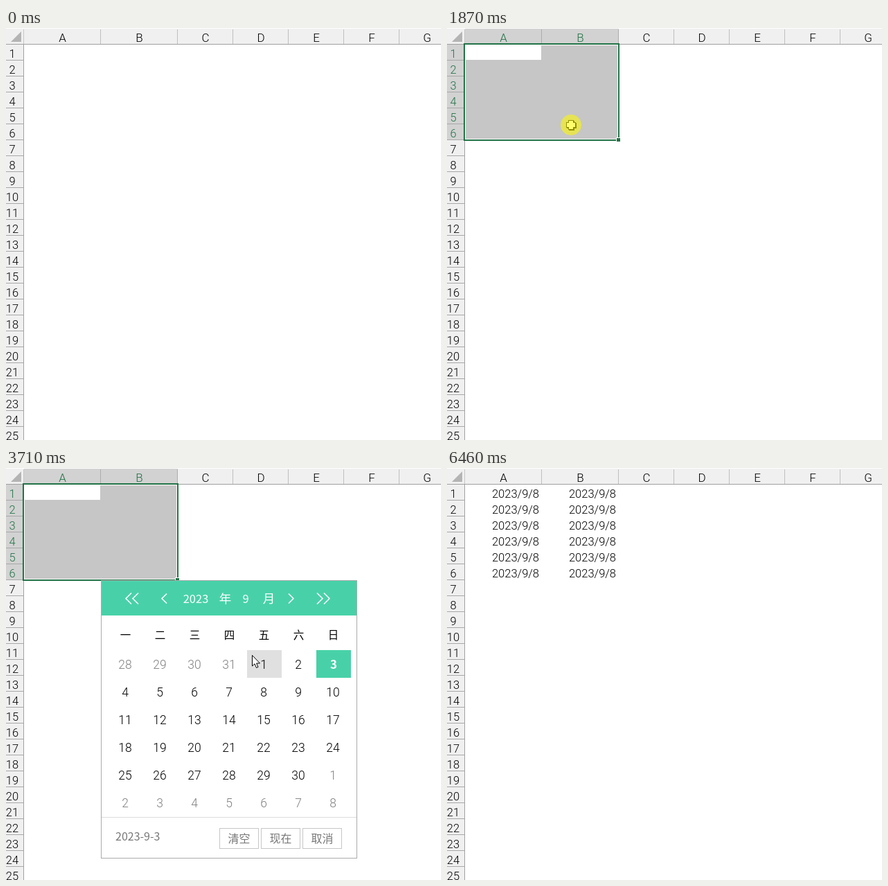
These frames come from a looping animation (628x595 px, 6.54 s). An HTML page with a canvas:

```html
<!DOCTYPE html>
<html lang="zh-CN">
<head>
<meta charset="utf-8">
<style>
html, body { margin: 0; width: 100%; height: 100%; overflow: hidden; background: #fff; }
canvas { display: block; }
</style>
</head>
<body>
<canvas id="stage" width="628" height="595"></canvas>
<script>
const g = document.getElementById('stage').getContext('2d');
const LOOP = 6540, START = 70, TICK = 77.4, ROW = 23;
const HAN = '"Noto Sans CJK SC", "Noto Sans CJK JP", sans-serif';
const LIGHT = 'Roboto, "Open Sans", sans-serif';
const GREEN = '#217346', MINT = '#48d1a8', INK = '#333', BLUE = '#1e7ec2', ORANGE = '#d9771c';

// Key moments of the story, in ms.
const AT = { click: 1310, release: 2040, context: 2210, menu: 2280, pick: 3000, menuGone: 3160,
  calendar: 3230, letGo: 3390, day: 4660, filled: 4810, exit: 6220, deselect: 6460 };

const ROUTE = [
  { t: 70, x: 468, y: 466 }, { t: 690, x: 93, y: 40 }, { t: 1390, x: 83, y: 34 },
  { t: 1850, x: 179, y: 140 }, { t: 2210, x: 185, y: 127 }, { t: 2430, x: 185, y: 127 },
  { t: 2620, x: 207, y: 135 }, { t: 2900, x: 246, y: 197 }, { t: 3300, x: 246, y: 197 },
  { t: 3700, x: 355, y: 269 }, { t: 4110, x: 371, y: 329 }, { t: 5520, x: 371, y: 329 },
  { t: 5670, x: 381, y: 319 }, { t: 5800, x: 385, y: 325 }, { t: 6220, x: 612, y: 600 }];

const within = (t, a, b) => t >= a && t < b;
const progress = (t, a, b) => Math.min(1, Math.max(0, (t - a) / (b - a)));
const mix = (a, b, p) => a + (b - a) * p;
const easeOut = p => 1 - (1 - p) ** 3;
const smooth = p => p * p * (3 - 2 * p);
const colEdge = c => c < 3 ? 25 + 111 * c : 247 + 80 * (c - 2);

function pointerAt(t) {
  const i = Math.max(1, ROUTE.findIndex(k => k.t > t));
  const [a, b] = [ROUTE[i - 1], ROUTE[i]];
  const p = progress(t, a.t, b.t);
  return { x: mix(a.x, b.x, p), y: mix(a.y, b.y, p) };
}

// The border shrinks onto the clicked cell, then grows with the drag.
function borderAt(t) {
  const surplus = 1 - easeOut(progress(t, AT.click, AT.click + 100));
  return {
    right: mix(136, 247, smooth(progress(t, 1566, 1840))) + 191 * surplus,
    bottom: mix(46, 161, smooth(progress(t, 1490, 1850))) + 92 * surplus
  };
}

function box(x, y, w, h, fill, stroke) {
  if (fill) { g.fillStyle = fill; g.fillRect(x, y, w, h); }
  if (stroke) {
    g.strokeStyle = stroke; g.lineWidth = 1;
    g.strokeRect(x + .5, y + .5, w - 1, h - 1);
  }
}

function text(s, x, y, size, { color = '#000', align = 'left', weight = 400, font = HAN } = {}) {
  g.font = `${weight} ${size}px ${font}`;
  g.fillStyle = color;
  g.textAlign = align;
  g.fillText(s, x, y);
}
const light = (s, x, y, size, color, align = 'center') =>
  text(s, x, y, size, { color, align, weight: 300, font: LIGHT });

function path(points, stroke = INK, width = 1.2, fill) {
  g.beginPath();
  for (let i = 0; i < points.length; i += 2) g.lineTo(points[i], points[i + 1]);
  if (fill) { g.closePath(); g.fillStyle = fill; g.fill(); }
  if (stroke) { g.strokeStyle = stroke; g.lineWidth = width; g.stroke(); }
}

function disc(x, y, r, { fill, stroke, width = 1.3 }) {
  g.beginPath(); g.arc(x, y, r, 0, 2 * Math.PI);
  if (fill) { g.fillStyle = fill; g.fill(); }
  if (stroke) { g.strokeStyle = stroke; g.lineWidth = width; g.stroke(); }
}

// A "v" with its tip at (x, y); (dx, dy) is the way it points.
function chevron(x, y, dx, dy, size = 3.5, stroke = INK, width = 1.2) {
  const [bx, by] = [x - dx * size, y - dy * size];
  path([bx - dy * size, by - dx * size, x, y, bx + dy * size, by + dx * size], stroke, width);
}

function arrow(x, y, dir, length) {
  path([x - dir * length, y, x, y], BLUE, 1.4);
  chevron(x, y, dir, 0, 3, BLUE, 1.4);
}

function drawHeaders(lastCol, lastRow) {
  box(0, 1, 628, 22, '#f0f0f0');
  box(0, 1, 25, 594, '#f0f0f0');
  path([7, 20, 22, 20, 22, 5], null, 0, '#b4b4b4');
  box(25, 2, 1, 21, '#c6c6c6');
  for (let c = 0; c < 7; c++) {
    const on = c <= lastCol, left = colEdge(c), right = colEdge(c + 1);
    if (on) box(left + 1, 1, right - left, 22, '#d2d2d2');
    box(right, 2, 1, 21, on ? '#acacac' : '#bfbfbf');
    light('ABCDEFG'[c], (left + right) / 2 + 1, 20, 17, on ? GREEN : '#000');
  }
  for (let r = 0; r < 25; r++) {
    const on = r <= lastRow, top = 24 + r * ROW;
    if (on) box(0, top, 25, ROW - 1, '#d2d2d2');
    box(0, top + ROW - 1, 25, 1, '#a8a8a8');
    light(r + 1, 9, top + 19, 16.5, on ? GREEN : '#000');
  }
  box(0, 23, 628, 1, '#a0a0a0');
  box(25, 23, 1, 572, '#a0a0a0');
}

function drawSelection({ right, bottom }, single) {
  if (!single) {
    box(27, 25, right - 28, bottom - 26, '#c6c6c6');
    box(27, 25, 109, 21, '#fff');
  }
  g.strokeStyle = GREEN; g.lineWidth = 2;
  g.strokeRect(25, 23, right - 24, bottom - 22);
  box(right - 3, bottom - 3, 6, 6, '#fff');
  box(right - 2, bottom - 2, 5, 5, GREEN);
}

function drawSheet(t, tick, pointer) {
  const selected = within(t, AT.click, AT.deselect), done = tick >= 1840;
  const lastCol = !selected ? -1 : done || pointer.x > 136 ? 1 : 0;
  const lastRow = !selected ? -1 : done ? 5 : Math.floor((pointer.y - 24) / ROW);

  box(0, 0, 628, 595, '#fff');
  drawHeaders(lastCol, lastRow);
  if (selected) drawSelection(borderAt(tick), lastCol + lastRow === 0);
  if (t >= AT.filled)
    for (let r = 0; r < 6; r++)
      for (let c = 1; c < 3; c++) light('2023/9/8', colEdge(c) - 3, 43 + r * ROW, 16.5, '#000', 'right');
}

function panel(x, y, w, h, border) {
  g.save();
  g.shadowColor = 'rgba(0,0,0,.22)'; g.shadowBlur = 5; g.shadowOffsetY = 1;
  box(x, y, w, h, '#fff');
  g.restore();
  box(x, y, w, h, null, border);
}

function combo(label, x, w) {
  g.beginPath(); g.roundRect(x + .5, 43.5, w, 29, 4);
  g.strokeStyle = '#8a8a8a'; g.lineWidth = 1; g.stroke();
  text(label, x + 3, 64, 15);
  chevron(x + w - 7, 60, 0, 1);
}

function fillBar(x, color) {
  box(x, 94, 20, 4, color);
  chevron(x + 32, 90, 0, 1);
}

function drawToolbar() {
  const ink = { color: INK }, right = { color: INK, align: 'right' }, mid = { color: INK, align: 'center' };
  panel(186, 38, 355, 70, '#cfcfcf');
  combo('等线', 193, 80);
  combo('11', 276, 60);
  text('A', 344, 64, 19, ink);
  chevron(360, 49, 0, -1, 3, BLUE, 1.4);
  text('A', 376, 64, 16, ink);
  chevron(390, 52, 0, 1, 3, BLUE, 1.4);

  box(404, 51, 18, 12, null, INK);
  disc(411, 57, 3, { stroke: INK });
  for (let y = 59; y < 69; y += 4) box(414, y - 2, 9, 4, '#fff', ORANGE);
  chevron(435, 60, 0, 1);
  text('%', 462, 65, 20, mid);
  disc(492, 54, 4, { fill: INK });
  path([496, 54, 489, 66, 491, 57], null, 0, INK);
  box(512, 48, 19, 19, null, INK);
  box(512, 53, 19, 9, '#cfe6f7', BLUE);
  arrow(515, 57.5, -1, 6);
  arrow(528, 57.5, 1, 6);

  text('B', 207, 94, 17, { ...mid, weight: 700 });
  text('I', 237, 94, 17, { ...mid, weight: 'italic 400', font: '"Noto Serif", serif' });
  for (let i = 0; i < 4; i++) box(257 + i % 2 * 3, 79 + i * 5, 19 - i % 2 * 6, 1, INK);
  path([291, 86, 297, 79, 304, 86, 297, 92], INK, 1.2, '#fff');
  path([304, 84, 306, 90], BLUE, 2);
  fillBar(287, '#ffe600');
  text('A', 346, 92, 18, mid);
  fillBar(336, '#dc1d10');
  g.setLineDash([1, 2]);
  for (let i = 0; i < 4; i++) box(386 + i % 2 * 9, 79 + (i >> 1) * 9, 10, 10, null, INK);
  g.setLineDash([]);
  box(385, 97, 20, 1, INK);
  chevron(417, 90, 0, 1);
  text('.0', 453, 86, 12, right);
  text('.00', 453, 97, 12, right);
  arrow(435, 82, -1, 8);
  text('.00', 483, 86, 12, right);
  text('.0', 483, 97, 12, right);
  arrow(473, 93, 1, 9);
  path([505, 88, 513, 80], INK, 3);
  path([496, 86, 502, 84, 508, 91, 504, 97], ORANGE, 1.2, '#f6b26b');
  path([502, 82, 510, 90], INK, 1.6);
}

function menuItem(label, y, color, weight) {
  text(label, 233, y, 15, { color, weight });
  const key = label.indexOf('(') + 1;
  if (!key) return;
  const start = 233 + g.measureText(label.slice(0, key)).width;
  box(start, y + 2, g.measureText(label[key]).width, 1, color);
}

function clipboard(x, y) {
  path([x + 6, y + 19, x, y + 19, x, y + 3, x + 14, y + 3, x + 14, y + 7], ORANGE, 1.6);
  box(x + 4, y, 7, 5, '#fff', INK);
}

function drawMenuIcons() {
  box(202, 177, 20, 18, null, INK);
  box(202, 181, 20, 1, INK);
  box(211, 187, 3, 3, INK);
  for (const side of [-1, 1]) {
    box(212 + side * 5, 175, 1, 4, INK);
    path([212 - side * 4, 215, 212 + side * 3, 230], INK);
    disc(212 + side * 3.5, 232, 2.4, { stroke: BLUE });
  }
  box(202, 250, 11, 18, '#fff', INK);
  box(208, 253, 14, 18, '#fff', INK);
  box(212, 262, 6, 1, INK);
  box(212, 266, 6, 1, INK);
  clipboard(204.5, 286);
  box(212, 293, 10, 13, '#fff', INK);
  clipboard(238.5, 326);
  box(246, 336, 12, 14, '#fff');
  text('A', 252, 349, 15, { color: INK, align: 'center' });
  disc(215, 412, 6.5, { stroke: BLUE });
  path([210, 417, 203, 424], BLUE, 1.6);
  box(214, 411, 2, 5, BLUE);
  box(214, 408, 2, 2, BLUE);
  box(206, 556, 16, 18, null, '#a0a0a0');
  for (let y = 561; y < 572; y += 4) box(209, y, 10, 1, '#a0a0a0');
  path([202, 570, 208, 563, 212, 568, 205, 575], null, 0, '#a0a0a0');
}

function drawMenu() {
  panel(186, 127, 279, 480, '#6a6a6a');
  box(193, 134, 265, 30, '#f3f3f3', '#808080');
  text('搜索菜单', 201, 153, 15, { color: '#777' });
  let y = 191.5;
  for (const label of ['日历', '-', '剪切(T)', '复制(C)', '粘贴选项:', '', '选择性粘贴(S)...', '-',
    '智能查找(L)', '-', '插入(I)...', '删除(D)...', '清除内容(N)', '-', '快速分析(Q)']) {
    if (label === '-') {
      box(228, Math.round(y - 21.5), 235, 1, '#c8c8c8');
      y += 3.2;
    } else {
      const title = label.endsWith(':');
      menuItem(label, Math.round(y) + 2 * title, label.startsWith('快速') ? '#b0b0b0' : '#222', title ? 700 : 400);
      y += label ? 36 : 44;
    }
  }
  drawMenuIcons();
}

function drawCalendar({ x, y }) {
  const white = { color: '#fff', align: 'center' };
  box(137, 162, 370, 402, '#fff', '#ababab');
  box(138, 163, 368, 50, MINT);
  for (const dir of [-1, 1]) {
    chevron(320 + dir * 95, 188.5, dir, 0, 7, '#fff', 1.6);
    for (const shift of [137, 147]) chevron(320 + dir * shift, 188.5, dir, 0, 8, '#fff', 1.6);
  }
  text('2023', 274, 195, 16.5, white);
  text('年', 316.5, 195, 17.5, white);
  text('9', 346, 195, 16.5, white);
  text('月', 379.5, 195, 17.5, white);
  [...'一二三四五六日'].forEach((day, i) => text(day, 172.5 + i * 50, 247, 15.5, { align: 'center' }));

  for (let i = 0; i < 42; i++) {
    const left = 148 + i % 7 * 50, top = 263 + Math.floor(i / 7) * 40;
    const day = i < 4 ? 28 + i : (i - 4) % 30 + 1;
    const today = i === 6, outside = i < 4 || i > 33;
    const hover = within(x, left, left + 50) && within(y, top, top + 40);
    if (today || hover) box(left, top, 50, 40, today ? MINT : '#e0e0e0');
    if (today) text(day, left + 25, top + 27, 17, { ...white, weight: 700 });
    else light(day, left + 24, top + 27, 17.5, outside ? '#808080' : '#000');
  }
  box(138, 504, 368, 1, '#dcdcdc');
  text('2023-9-3', 158, 538, 16, { color: '#777' });
  ['清空', '现在', '取消'].forEach((label, i) => {
    box(308 + i * 60, 520, 57, 30, '#fff', '#c6c6c6');
    text(label, 336.5 + i * 60, 541, 16, { color: '#777', align: 'center' });
  });
}

function plus(reach, half, color, shift = 0) {
  box(shift - reach, shift - half, 2 * reach, 2 * half, color);
  box(shift - half, shift - reach, 2 * half, 2 * reach, color);
}

function drawPointer(kind, { x, y }) {
  g.save();
  g.translate(Math.round(x), Math.round(y));
  if (kind === 'cross') {
    plus(7, 4, '#000', 1);
    plus(7, 4, '#000');
    plus(6, 3, '#fff');
  } else if (kind === 'beam') {
    box(0, -6, 1, 13, '#000');
    for (const end of [-7, 7])
      for (const side of [-3, 1]) box(side, end, 3, 1, '#000');
  } else {
    path([.5, .5, .5, 16, 4, 12.8, 6.5, 18.5, 9, 17.4, 6.6, 12, 11.5, 12], '#000', 1, '#fff');
  }
  g.restore();
}

function draw(now) {
  const t = now % LOOP;
  const tick = t < START ? 0 : START + Math.floor((t - START) / TICK) * TICK;
  const pointer = pointerAt(tick);
  const menu = within(t, AT.menu, AT.menuGone), calendar = within(t, AT.calendar, AT.filled);

  drawSheet(t, tick, pointer);
  if (menu) { drawToolbar(); drawMenu(); }
  if (calendar) drawCalendar(pointer);
  if (!within(t, START, AT.exit)) return;

  const searching = menu && pointer.x >= 193 && within(pointer.y, 134, 164);
  drawPointer(searching ? 'beam' : menu || calendar ? 'arrow' : 'cross', pointer);
  const pressed = within(t, AT.click, AT.release) || within(t, AT.context, 2440)
    || within(t, AT.pick, AT.letGo) || within(t, AT.day, AT.filled);
  if (pressed) disc(pointer.x, pointer.y, 15, { fill: 'rgba(255,250,0,.57)' });
}

const start = performance.now();
function frame() {
  draw(performance.now() - start);
  requestAnimationFrame(frame);
}
frame();
</script>
</body>
</html>
```
